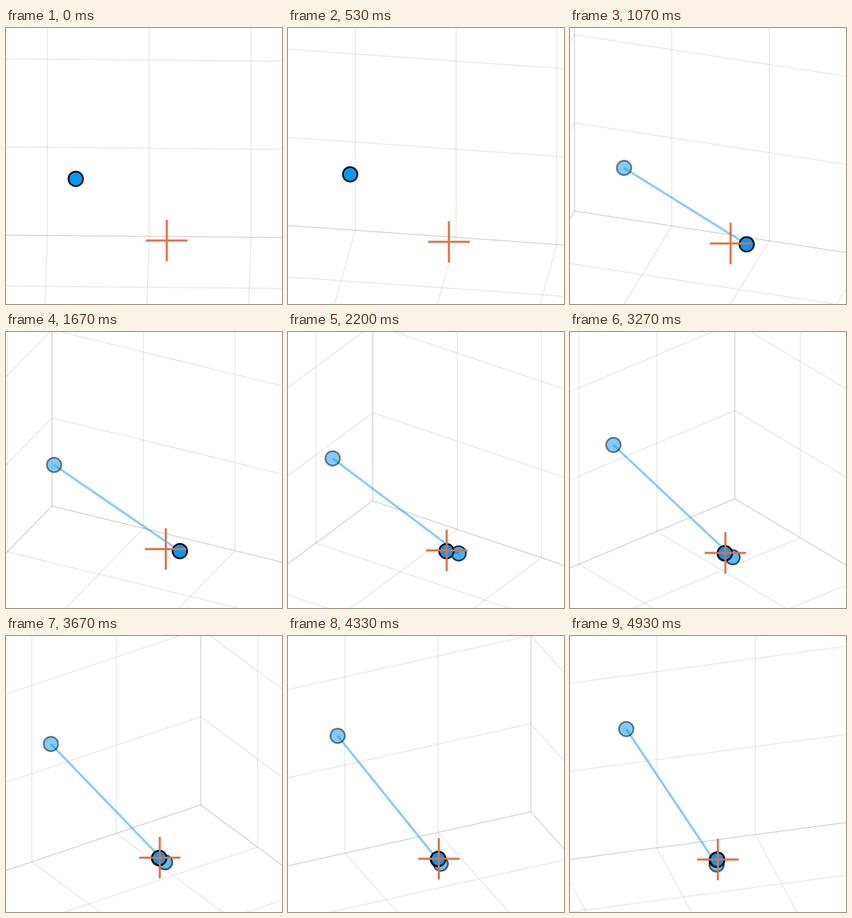
Animation of 400x400 px, one loop 4990 ms. Source, as a matplotlib script:

```python
import numpy as np
import matplotlib.pyplot as plt
from matplotlib.animation import FuncAnimation
from matplotlib.collections import LineCollection
from matplotlib.patches import Circle

SIZE, LOOP, FRAMES = 400, 4990, 75
HOLD = 15                       # frames per optimiser step
CENTER = np.array([202.5, 194.0])
UNIT = 147.5                    # pixels per grid cell
ELEV = np.radians(30)
BLUE, ORANGE = "#009AFA", "#E26F46"

# Optimiser path: x to the right, y towards the viewer, z up
STEPS = np.array([
    [-0.676, 0.668, 0.186],
    [0.390, 0.034, -0.851],
    [0.213, -0.013, -0.905],
    [0.206, -0.021, -0.9065],
    [0.206, -0.021, -0.9065],
])
MINIMUM = np.array([0.2063, -0.0276, -0.9065])


def project(p, azim):
    """Orthographic view of points shaped (..., 3), in pixels."""
    x, y, z = np.moveaxis(np.asarray(p, float), -1, 0)
    c, s = np.cos(azim), np.sin(azim)
    u = x * c - y * s
    v = (x * s + y * c) * np.sin(ELEV) - z * np.cos(ELEV)
    return CENTER + UNIT * np.stack([u, v], axis=-1)


def grid_lines():
    """Grid on the floor and both back walls; shared edges occur twice."""
    lines = []
    for wall in range(3):
        a, b = [axis for axis in range(3) if axis != wall]
        for fixed, free in ((a, b), (b, a)):
            for tick in range(-2, 3):
                ends = np.full((2, 3), -2.0)
                ends[:, fixed] = tick
                ends[:, free] = -2, 2
                lines.append(ends)
    return np.array(lines)


GRID = grid_lines()

fig = plt.figure(figsize=(4, 4), dpi=100, facecolor="white")
ax = fig.add_axes([0, 0, 1, 1])
ax.set(xlim=(0, SIZE), ylim=(SIZE, 0))
ax.axis("off")
PX = 72 / fig.dpi

grid = LineCollection([], colors=[(0, 0, 0, 0.12)], linewidths=PX, zorder=1)
grid.set_snap(False)
ax.add_collection(grid)


def stroke(color, z):
    return ax.plot([], [], color=color, lw=3 * PX, zorder=z,
                   solid_capstyle="butt", snap=False)[0]


segments = [stroke(BLUE, 2) for _ in STEPS[1:]]
dots = [ax.add_patch(Circle((0, 0), 10.5, fc=BLUE, ec="black", lw=2.4 * PX, zorder=3))
        for _ in STEPS]
cross = [stroke(ORANGE, 4) for _ in range(2)]


def draw(k):
    azim = np.radians(1 + k)
    count = k // HOLD + 1
    alphas = np.linspace(0.5, 1, count) if count > 1 else [1]
    pts = project(STEPS, azim)

    grid.set_segments(project(GRID, azim))
    for i, dot in enumerate(dots):
        dot.set_visible(i < count)
        if i < count:
            dot.center = pts[i]
            dot.set_alpha(alphas[i])
    for i, seg in enumerate(segments):
        seg.set_visible(i + 1 < count)
        if i + 1 < count:
            seg.set_data(pts[i:i + 2].T)
            seg.set_alpha(alphas[i])

    x, y = project(MINIMUM, azim)
    cross[0].set_data([x - 30, x + 30], [y, y])
    cross[1].set_data([x, x], [y - 30, y + 30])
    return [grid, *segments, *dots, *cross]


anim = FuncAnimation(fig, draw, frames=FRAMES, interval=LOOP / FRAMES,
                     repeat=True, repeat_delay=0, blit=False)
plt.show()
```
